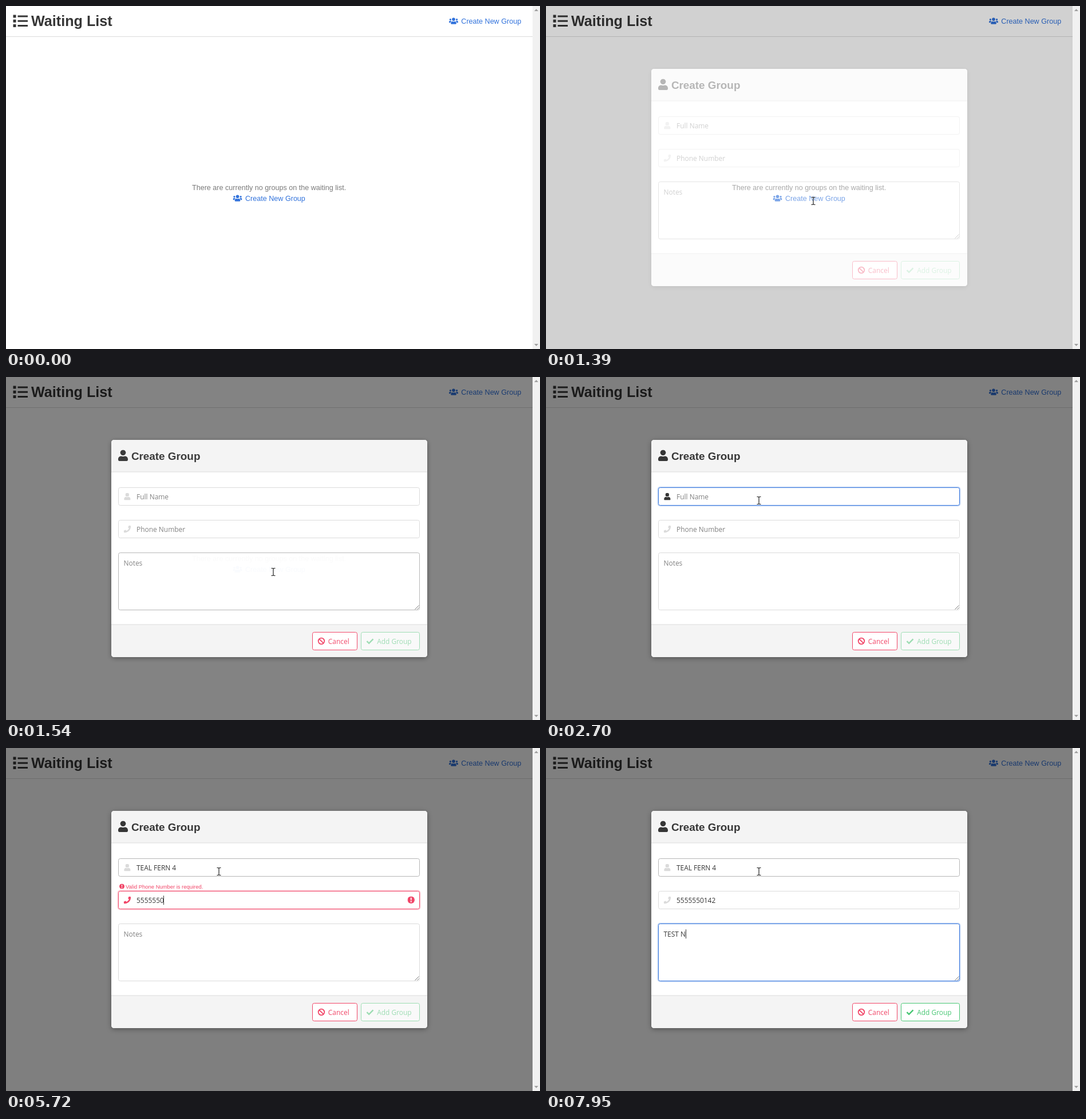
Write an HTML page that moves like this. It is 933 px wide and 600 px high and loops after 8 s.

```html
<!DOCTYPE html>
<html lang="en">
<head>
<meta charset="utf-8">
<title>Waiting List</title>
<style>
html, body { margin: 0; width: 100%; height: 100%; overflow: hidden; background: #fff; }
svg { display: block; }
text { font: 12.58px "Liberation Sans", Arial, sans-serif; fill: currentColor; white-space: pre; }
use { fill: currentColor; }
.link { color: #3273dc; }
.link.hover { color: #363636; }
.heading { color: #363636; }
.heading text { font-weight: bold; }
.form text { font: 11.95px "Open Sans", "Noto Sans", sans-serif; }
.field { color: #dbdbdb; }
.box { fill: #fff; stroke: #dbdbdb; }
.glow { fill: none; stroke: none; stroke-width: 2; }
.value { color: #363636; }
.value.empty { color: #808080; }
.caret { stroke: #363636; visibility: hidden; }
.hover .box { stroke: #b5b5b5; }
.focus { color: #363636; }
.focus .box { stroke: #3273dc; }
.focus .glow { stroke: rgba(50, 115, 220, .25); }
.invalid { color: #f14668; }
.invalid .box { stroke: #f14668; }
.invalid .glow { stroke: rgba(241, 70, 104, .25); }
.button rect { fill: #fff; stroke: currentColor; }
.button path, .button circle { fill: none; stroke: currentColor; stroke-width: 1.8; }
#error { color: #f14668; }
#error text { font: 9.42px "Liberation Sans", Arial, sans-serif; }
</style>
</head>
<body>
<svg width="933" height="600" viewBox="0 0 933 600">
  <defs>
    <symbol id="users" viewBox="0 0 640 512">
      <circle cx="96" cy="160" r="64"/><circle cx="544" cy="160" r="64"/><circle cx="320" cy="144" r="112"/>
      <path d="M64 256h64q27 0 45 18.600-66 38-75 109.400H32q-32 0-32-32v-32q0-64 64-64zM576 256h-64q-27 0-45 18.600 66 38 75 109.400h66q32 0 32-32v-32q0-64-64-64z"/>
      <path d="M243 288h8q69 32 138 0h8q115 8 115 115v29q0 48-48 48H176q-48 0-48-48v-29q0-107 115-115z"/>
    </symbol>
    <symbol id="user" viewBox="0 0 448 512">
      <circle cx="224" cy="128" r="128"/>
      <path d="M314 288h-17q-73 32-146 0h-17C60 288 0 348 0 422v42q0 48 48 48h352q48 0 48-48v-42c0-74-60-134-134-134z"/>
    </symbol>
    <symbol id="phone" viewBox="0 0 512 512">
      <path d="M493 25 389 1q-20-3-27 13l-48 112q-5 17 7 28l60 50Q325 324 204 381l-49-61q-12-12-28-7L15 361q-18 10-14 28l24 104q6 19 23 19c256 0 464-208 464-464q0-18-19-23z"/>
    </symbol>
    <symbol id="alert" viewBox="0 0 16 16">
      <circle cx="8" cy="8" r="8"/><path d="M6.700 3h2.600l-.4 6H7.100z" fill="#fff"/><circle cx="8" cy="11.700" r="1.500" fill="#fff"/>
    </symbol>
  </defs>

  <g class="heading">
    <path fill="currentColor" d="M12.500 15.500h5v5h-5zm0 8.200h5v5h-5zm0 8.200h5v5h-5zM20.500 16.500H38v3H20.500zm0 8.200H38v3H20.500zm0 8.200H38v3H20.500z"/>
    <text x="44" y="35.300" style="font-size:25.170px">Waiting List</text>
  </g>
  <g class="link">
    <use href="#users" x="774" y="19.700" width="16" height="12.800"/>
    <text x="795.300" y="31">Create New Group</text>
  </g>
  <path d="M0 53.500H920" stroke="#dbdbdb"/>
  <text x="325" y="322" color="#7a7a7a">There are currently no groups on the waiting list.</text>
  <g class="link" id="centerLink">
    <use href="#users" x="396.500" y="329.700" width="16" height="12.800"/>
    <text x="418" y="341">Create New Group</text>
  </g>

  <g id="modal">
    <path d="M0 0H920V600H0z" opacity=".5"/>
    <rect x="184" y="110" width="552" height="380" rx="5" fill="#fff" style="filter:drop-shadow(0 2px 4px rgba(0,0,0,.35))"/>
    <path d="M184 166V115q0-5 5-5H731q5 0 5 5V166zM184 433H736V485q0 5-5 5H189q-5 0-5-5z" fill="#f4f4f4"/>
    <path d="M184 166H736M184 433H736" stroke="#dbdbdb"/>
    <g class="heading">
      <use href="#user" x="196" y="127.500" width="17" height="19.400"/>
      <text x="218.900" y="144.500" style="font-size:18.870px">Create Group</text>
    </g>
    <g class="form">
      <g id="fields"></g>
      <path d="M714.500 406.500l7-7M718.500 406.500l3-3" stroke="#777"/>
      <g id="error">
        <use href="#alert" x="198" y="237.500" width="9" height="9"/>
        <text x="209" y="246">Valid Phone Number is required.</text>
        <use href="#alert" x="701.500" y="259.500" width="12.500" height="12.500"/>
      </g>
      <g class="button" color="#f14668">
        <rect x="535.500" y="446.500" width="78" height="31" rx="3"/>
        <circle cx="551" cy="462" r="5.300"/><path d="M547.300 458.300l7.400 7.400"/>
        <text x="562.800" y="466.700">Cancel</text>
      </g>
      <g class="button" id="add" color="#48c774">
        <rect x="620.500" y="446.500" width="102" height="31" rx="3"/>
        <path d="M630.500 462.200l3.700 3.600 7.300-7.500" style="stroke-width:2.500"/>
        <text x="648.200" y="466.700">Add Group</text>
      </g>
    </g>
  </g>

  <g>
    <path d="M920 0h13V600H920z" fill="#f1f1f1"/>
    <path d="M923 9l3.500-4 3.500 4zM923 591l3.500 4 3.500-4z" fill="#a0a0a0"/>
  </g>

  <g id="cursor">
    <path id="arrow" d="M0 0V13.500l3.200-2.900 2.100 4.800 2.100-.9-2-4.600H9.600z" fill="#fff" stroke="#000" stroke-width=".9"/>
    <path id="hand" d="M-1.200 8V.8q1.200-1.600 2.400 0V5l5.600 1.400q1.200.4 1 2L7 14.500H.4L-4 9q.4-2 2.800-1z" fill="#fff" stroke="#000" stroke-width=".9"/>
    <path id="beam" d="M-3.500-6.500h2.300L0-5.500l1.200-1h2.300M0-5.500v11M-3.500 6.500h2.300L0 5.500l1.200 1h2.300" fill="none" stroke="#222" stroke-width="1.200"/>
  </g>
</svg>
<script>
const LOOP = 8000, BLINK = 530, FADE_START = 1270, FADE_TIME = 300;
const $ = id => document.getElementById(id);

const fields = [
  { hint: 'Full Name', text: 'TEAL FERN 4', icon: 'user', x: 228, y: 193, h: 32, base: 214.3, from: 2080, to: 4390,
    keys: [2710, 2780, 2860, 3010, 3240, 3320, 3400, 3470, 3550, 3930, 4160] },
  { hint: 'Phone Number', text: '5555550142', icon: 'phone', x: 228, y: 250, h: 32, base: 271.3, from: 4390, to: 6550,
    keys: [4700, 4870, 4940, 5170, 5340, 5490, 5720, 5890, 6060, 6230] },
  { hint: 'Notes', text: 'TEST N', x: 205.5, y: 307, h: 101, base: 330.3, from: 6550, to: LOOP,
    keys: [7560, 7630, 7710, 7790, 7870, 7950] },
];
const phone = fields[1];

for (const f of fields) {
  const rect = (cls, grow) => `<rect class="${cls}" x="${196.5 - grow}" y="${f.y + .5 - grow}"
    width="${526 + 2 * grow}" height="${f.h - 1 + 2 * grow}" rx="${3 + grow}"/>`;
  const icon = f.icon ? `<use href="#${f.icon}" x="205.500" y="${f.y + 9.7}" width="12.700" height="12.700"/>` : '';
  f.node = document.createElementNS('http://www.w3.org/2000/svg', 'g');
  f.node.innerHTML = rect('glow', 1) + rect('box', 0) + icon +
    `<text class="value" x="${f.x}" y="${f.base}"></text><path class="caret" d="M0 ${f.base - 13}v16"/>`;
  $('fields').append(f.node);
  f.value = f.node.querySelector('.value');
  f.caret = f.node.querySelector('.caret');
}

// time, x, y of the pointer
const path = [
  [290, 727, 535], [520, 516, 384], [620, 516, 384], [990, 467, 341], [1540, 467, 341],
  [2010, 369, 214], [2170, 369, 214], [2250, 372, 216],
];
const smooth = u => (u = Math.min(1, Math.max(0, u)), u * u * (3 - 2 * u));
const inside = ([x, y], left, top, right, bottom) => x >= left && x <= right && y >= top && y <= bottom;

function pointerAt(t) {
  const i = path.findIndex(p => p[0] > t);
  if (i < 1) return path[i < 0 ? path.length - 1 : 0].slice(1);
  const [a, b] = [path[i - 1], path[i]];
  const u = smooth((t - a[0]) / (b[0] - a[0]));
  return [1, 2].map(k => a[k] + (b[k] - a[k]) * u);
}

function drawField(f, t, pointer) {
  const pressed = f.keys.filter(k => k <= t);
  const focus = t >= f.from && t < f.to;
  f.invalid = f === phone && pressed.length > 0 && pressed.length < f.text.length;
  f.hover = inside(pointer, 196, f.y, 723, f.y + f.h);
  f.node.setAttribute('class', ['field', f.hover && 'hover', focus && 'focus', f.invalid && 'invalid'].filter(Boolean).join(' '));
  f.value.textContent = pressed.length ? f.text.slice(0, pressed.length) : f.hint;
  f.value.classList.toggle('empty', !pressed.length);
  const idle = t - (pressed.at(-1) ?? f.from);
  f.caret.style.visibility = focus && idle % (2 * BLINK) < BLINK ? 'visible' : 'hidden';
  const width = pressed.length ? f.value.getComputedTextLength() : 0;
  f.caret.setAttribute('transform', `translate(${Math.floor(f.x + width) + .5} 0)`);
}

function draw(t) {
  const pointer = pointerAt(t), open = t >= FADE_START;
  $('modal').style.opacity = smooth((t - FADE_START) / FADE_TIME);
  $('modal').style.display = open ? '' : 'none';
  if (open) for (const f of fields) drawField(f, t, pointer);
  $('error').style.display = phone.invalid ? '' : 'none';
  $('add').style.opacity = t >= phone.keys.at(-1) ? 1 : .5;

  const onLink = !open && inside(pointer, 396, 329, 523, 344);
  $('centerLink').classList.toggle('hover', onLink);
  const shape = onLink ? 'hand' : open && fields.some(f => f.hover) ? 'beam' : 'arrow';
  for (const id of ['arrow', 'hand', 'beam']) $(id).style.display = id === shape ? '' : 'none';
  $('cursor').style.display = t < path[0][0] ? 'none' : '';
  $('cursor').setAttribute('transform', `translate(${pointer.map(Math.round)})`);
}

const start = performance.now();
(function frame() {
  draw((performance.now() - start) % LOOP);
  requestAnimationFrame(frame);
})();
</script>
</body>
</html>
```
